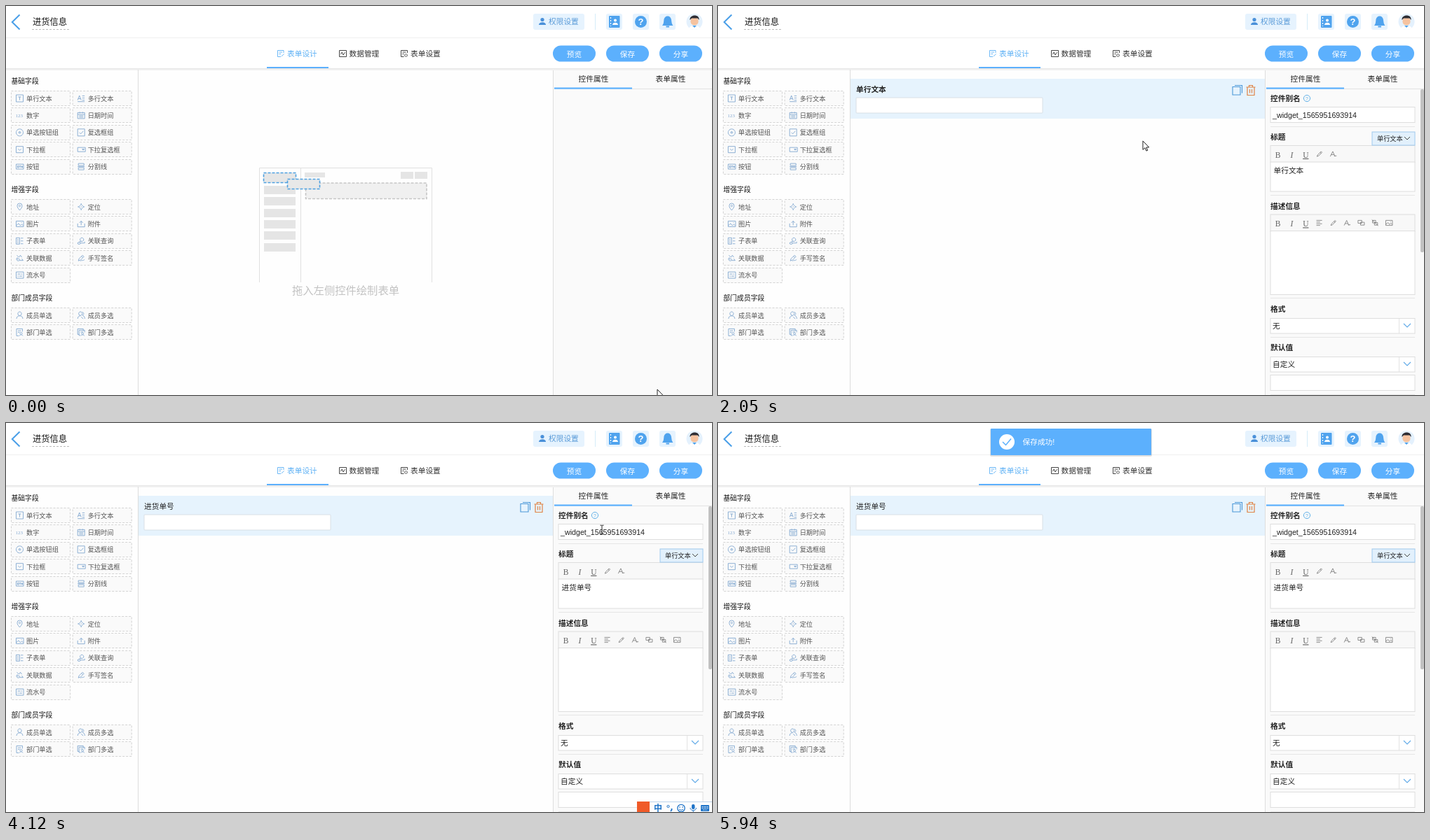
These frames come from a looping animation (1007 by 556 pixels, 6180 ms). An HTML page:

```html
<!DOCTYPE html>
<html lang="zh-CN">
<head>
<meta charset="utf-8">
<title>表单设计</title>
<style>
html, body { margin: 0; width: 100%; height: 100%; overflow: hidden; background: #fefefe; }
svg { display: block; width: 1007px; height: 556px; }
text { font-family: "Liberation Sans", "Noto Sans CJK SC", "Noto Sans CJK", sans-serif; white-space: pre; }
.serif { font-family: "Liberation Serif", "Noto Serif", serif; }
</style>
</head>
<body>
<svg id="stage" viewBox="0 0 1007 556"></svg>
<script>
const LOOP = 6180;
const BLUE = '#5cb0fd', PALE = '#e6f3fe', LINE = '#dedede';
const S = 9.2, M = 10.7, L = 12.25;

// Drawing helpers: every one returns SVG markup
const rect = (x, y, w, h, fill, more = '') =>
  `<rect x="${x}" y="${y}" width="${w}" height="${h}" fill="${fill}" ${more}/>`;
const box = (x, y, w, h, fill = '#fff', stroke = LINE, more = '') =>
  rect(x + .5, y + .5, w, h, fill, `stroke="${stroke}" ${more}`);
const disc = (x, y, r, fill, more = '') => `<circle cx="${x}" cy="${y}" r="${r}" fill="${fill}" ${more}/>`;
const text = (x, cy, size, str, fill = '#222', more = '') =>
  `<text x="${x}" y="${(cy + size * .38).toFixed(2)}" font-size="${size}" fill="${fill}" ${more}>${str}</text>`;
const mid = 'text-anchor="middle"', bold = 'font-weight="700"';
const path = (d, stroke, width = 1, fill = 'none', more = '') =>
  `<path d="${d}" stroke="${stroke}" stroke-width="${width}" fill="${fill}" ${more}/>`;
const group = (id, body, more = '') => `<g id="${id}" ${more}>${body}</g>`;

// Line icons in a 10 by 10 cell
const ICONS = {
  text: 'M0 0H10V10H0ZM3 3H7M5 3V7.5',
  area: 'M0 7.5L2.5 1L5 7.5M1 5.5H4M6.5 1.5H10M6.5 4.5H10M6.5 7.5H10M0 9.7H10',
  date: 'M0 1H10V9.5H0ZM0 3.6H10M3 0V2M7 0V2M2 5.5H8M2 7.5H8',
  radio: 'M5 0a5 5 0 1 0 .01 0ZM5 3.6a1.4 1.4 0 1 0 .01 0ZM4.2 5H5.8',
  check: 'M0 0H10V10H0ZM2.5 5L4.5 7L8 3',
  drop: 'M0 .5H10V9.5H0ZM2.8 4L5 6.2L7.2 4',
  multi: 'M0 2H11V8H0ZM6.5 4.3H9.5L8 6Z',
  button: 'M0 1.5H10.5V8.5H0ZM2 3.8V6.5H3.5V3.8ZM4.5 4H6.5M5.5 4V6.5M7.5 6.5V4L9 6.5V4',
  divide: 'M1 .5H9V3.5H1ZM0 5H10M1 6.5H9V9.5H1Z',
  pin: 'M5 10C2 6.5 1.5 5 1.5 3.5A3.5 3.5 0 0 1 8.5 3.5C8.5 5 8 6.5 5 10ZM5 2.4a1.2 1.2 0 1 0 .01 0Z',
  locate: 'M5 1.5L8.5 5L5 8.5L1.5 5ZM5 0V2M5 8V10M0 5H2M8 5H10M4.3 5H5.7',
  image: 'M0 1H10.5V9H0ZM0 7.5L3.5 4.5L6 7.5L8 5.5L10 7.5M7 3.2H8',
  upload: 'M0 4.5V9.3H10V4.5M5 7V1M2.5 3.5L5 1L7.5 3.5',
  sub: 'M0 .5H5V9.5H0ZM1.5 3H3.5M1.5 5.2H3.5M1.5 7.4H3.5M6.5 1H10M6.5 5H10M6.5 9H10',
  query: 'M6 .5a2.6 2.6 0 1 0 .01 0ZM5 5.5L2 6.5M0 8.3a2 1.4 0 1 0 4 0a2 1.4 0 1 0 -4 0M4 8H10V6',
  link: 'M1 1L4 4L6 1L8 4M2 4L0 7M1 7.5a2 1.5 0 1 0 4 0a2 1.5 0 1 0 -4 0M5 8.5H10L8 6',
  sign: 'M1 9L2 6L7 1L9 3L4 8ZM4 9.5C6 7 7 10 10 7M5.5 2.5L7.5 4.5',
  serial: 'M0 .5H10.5V9.5H0ZM2 3.5H6M7 3.5H8.5M2 6.5H3.5M4.5 6.5H8.5',
  user: 'M5 0a2.6 2.8 0 1 0 .01 0ZM.5 10C.8 7 2.5 5.8 5 5.8S9.2 7 9.5 10',
  users: 'M4 0a2.5 2.7 0 1 0 .01 0ZM0 10C.3 7 1.8 5.8 4 5.8M6.5 .5C9.5 1 9 4.5 7 5C9 6 10 7.5 10.3 10M5 7.5L8 10',
  dept: 'M9 4V0H.5V10H4M2.5 2.7H7M2.5 5H5M7 5a1.5 1.5 0 1 0 .01 0M4.8 10C5 8 9 8 9.5 10',
  depts: 'M8 3V0H0V8H2M2 2V9.5H4M2 2H10V5M4 4.5H8M7 5.5a1.4 1.4 0 1 0 .01 0M4.8 10C5 8 9 8 9.5 10',
  form: 'M9 4V.5H.5V9.5H5M2.5 3H7M2.5 5.5H5M6 9L9.5 5.5',
  data: 'M0 .5H10V9.5H0ZM1.8 6L3.8 3L5.5 7L8.2 3.2',
  gear: 'M9.5 4V.5H.5V9.5H4.5M2.5 3H7.5M2.5 5.5H4.5M7.5 5.7a1.8 1.8 0 1 0 .01 0',
  pen: 'M1 9L2 6.5L7.5 1L9 2.5L3.5 8ZM6 2.5L7.5 4',
  font: 'M0 9L4 1L7.5 9M1.5 6H6M6 8H10',
  align: 'M0 1H9M0 3.7H6M0 6.4H9M0 9H6',
  chain: 'M0 1H6V5.5H0ZM4 4H10V8.5H4Z',
  unlink: 'M1 1H6V5H1ZM4 4.5H9V8.5H4ZM0 0L10 9.5'
};
const icon = (name, x, cy, color = '#83a9d1', k = 1) =>
  path(ICONS[name], color, .9, 'none', `transform="translate(${x} ${cy - 5 * k}) scale(${k})"`);

const FIELDS = [
  ['基础字段', 107, 132, '单行文本 text,多行文本 area,数字 num,日期时间 date,单选按钮组 radio,复选框组 check,下拉框 drop,下拉复选框 multi,按钮 button,分割线 divide'],
  ['增强字段', 262, 287, '地址 pin,定位 locate,图片 image,附件 upload,子表单 sub,关联查询 query,关联数据 link,手写签名 sign,流水号 serial'],
  ['部门成员字段', 417, 442, '成员单选 user,成员多选 users,部门单选 dept,部门多选 depts']
];

function field(x, cy, label, name, hot) {
  const mark = name === 'num'
    ? text(x + 6.5, cy, 7, '123', '#83a9d1', 'class="serif"')
    : icon(name, x + 7.5, cy);
  return box(x, Math.round(cy) - 11, 84, 21, hot ? '#e9f6fe' : '#fafafa', hot ? BLUE : '#d3d3d3',
    'stroke-dasharray="3 2"') + mark + text(x + 22, cy, S, label, '#555');
}

function sidebar() {
  return FIELDS.map(([title, y, first, list]) =>
    text(7.5, y, 9.8, title, '#111') + list.split(',').map((item, i) =>
      field(7 + 87.7 * (i % 2), first + 24.4 * (i >> 1), ...item.split(' '))).join('')
  ).join('') + rect(188, 91, 1, 465, '#dcdcdc');
}

function header() {
  const pill = (x, s) => rect(x, 56.5, 61, 23, BLUE, 'rx="11.5"') + text(x + 30.5, 68.5, M, s, '#fff', mid);
  const tile = x => rect(x, 11, 23, 23, PALE, 'rx="3"');
  const tab = (x, name, s, color) => icon(name, x, 68, color) + text(x + 14, 68, M, s, color);
  return rect(0, 0, 1007, 89, '#fff') + rect(0, 45, 1007, 1, '#efefef')
    + rect(0, 89, 1007, 1, '#e6e6e6') + rect(0, 90, 1007, 2, '#f1f1f1')
    + path('M19.5 12.5L8.8 23L19.5 33.5', '#4a9fe8', 2)
    + text(38, 22, L, '进货信息', '#111')
    + path('M37 33.5H91', '#bbb', 1, 'none', 'stroke-dasharray="3 2"')
    + rect(752, 11, 73, 23, PALE, 'rx="3"')
    + disc(765, 19.5, 2.6, '#4a90d9') + path('M760 27C760 22 770 22 770 27Z', 'none', 0, '#4a90d9')
    + text(774, 22, M, '权限设置', '#5a9bd8')
    + rect(840, 11, 1, 23, '#d4ecf8')
    + tile(856) + tile(894) + tile(932)
    + rect(860, 14, 15.5, 17, '#4fa3ee', 'rx="1"') + path('M862.5 16V29', '#fff', 1.2, 'none', 'stroke-dasharray="2 2"')
    + disc(869, 20.5, 2, '#fff') + path('M865 27C865 22.5 873 22.5 873 27Z', 'none', 0, '#fff')
    + disc(905.5, 22.5, 8.5, '#4fa3ee') + text(905.5, 22.5, 13, '?', '#fff', mid + ' ' + bold)
    + path('M936 28C938 26 938 23 938.4 20C939 12.500 948.500 12.500 949 20C949.500 23 949.500 26 951.500 28Z', 'none', 0, '#4fa3ee')
    + path('M941.500 29.500H946', '#4fa3ee', 2)
    + disc(982, 22.5, 11.5, '#e4f1fd')
    + path('M974.500 32C975 26.500 989 26.500 989.500 32C985 34.500 979 34.500 974.500 32Z', 'none', 0, '#fff')
    + path('M979 28L982 31L985 28Z', 'none', 0, '#4fa3ee')
    + rect(976.5, 16, 11, 11.5, '#f5c3a0', 'rx="5"')
    + path('M975.500 20C974.500 12 989.500 11 988.500 20L986.500 17.500H978Z', 'none', 0, '#2d2d33')
    + tab(387, 'form', '表单设计', '#5cb0f5') + tab(475.5, 'data', '数据管理', '#333') + tab(563, 'gear', '表单设置', '#333')
    + rect(372, 87, 88, 2, BLUE)
    + pill(780, '预览') + pill(856, '保存') + pill(932, '分享');
}

function emptyCanvas() {
  const grey = '#e5e5e5';
  const dashed = (x, y, w, h, stroke, fill) => rect(x, y, w, h, fill, `stroke="${stroke}" stroke-width="1.6" stroke-dasharray="4 2"`);
  let out = path('M361.500 395V231.500H607.500V395M420.500 232V395', '#e0e0e0');
  for (let i = 0; i < 6; i++) out += rect(368, Math.round(256.7 + 16.4 * i), 45, 12, grey);
  return out + rect(426, 238, 29, 7, grey) + rect(563, 237, 18, 10, grey) + rect(583, 237, 18, 10, grey)
    + dashed(427.5, 253, 172.5, 22.5, '#c6c6c6', '#f0f0f0')
    + dashed(367.5, 238.5, 46, 14, '#4da0e0', '#e6e6e6') + dashed(401.5, 247.5, 46, 14, '#4da0e0', '#e8e8e8')
    + text(484.5, 406, 15.3, '拖入左侧控件绘制表单', '#c3c3c3', mid);
}

function card() {
  return rect(189, 104, 591, 57, '#e6f3fd')
    + `<text id="label" x="197" y="123.100" font-size="${M}" fill="#222"></text>`
    + box(196.5, 130.5, 266, 22, '#fff', '#d8dfe6', 'rx="1"')
    + path('M737 113.500H747.500V124.500M734 115.500H745V127H734Z', '#4a97d8', 1.1)
    + path('M753.500 116H766.500M757.500 116V113.500H762.500V116M755 116V127.500H765V116M758.500 119V124.500M761.500 119V124.500', '#df8345', 1.2);
}

function properties() {
  const head = (y, s) => text(788, y, M, s, '#222', bold);
  const rule = y => rect(788, y, 206, 1, '#e6e6e6');
  const ink = '#777';
  const tools = (y, names) => box(787.5, y - 12.5, 206, 24, '#f8f8f8')
    + ['B', 'I', 'U'].map((c, i) => text(798.7 + 19.8 * i, y + 1, 11.5, c, '#666',
        `class="serif" ${mid} ${['', 'font-style="italic"', 'text-decoration="underline"'][i]}`)).join('')
    + names.map((n, i) => icon(n, 853.5 + 19.8 * i, y, ink, .9)).join('');
  const select = (y, s) => box(787.5, y - 11, 206, 21.5) + rect(971, y - 10, 1, 21, '#e2e2e2')
    + text(791, y, M, s) + path(`M978 ${y - 3}L983 ${y + 2}L988 ${y - 3}`, '#62abe8', 1.2);
  return head(132, '控件别名') + disc(840, 132, 4.6, 'none', 'stroke="#62b1e8"') + text(840, 132, 7, '?', '#62b1e8', mid)
    + box(787.5, 144, 206, 22) + text(791, 155.7, M, '_widget_1565951693914')
    + rule(172) + head(187, '标题')
    + tools(211.5, ['pen', 'font']) + box(787.5, 222.5, 206, 42)
    + box(932.5, 179.5, 61, 19, '#e2f0fc', '#9fcaee') + text(940, 189, S, '单行文本') + path('M979 187L983 191L987 187', '#444')
    + `<text id="entry" x="792.500" y="239.300" font-size="${M}" fill="#222"></text>`
    + rule(270) + head(286, '描述信息')
    + tools(310, ['align', 'pen', 'font', 'chain', 'unlink', 'image']) + box(787.5, 321, 206, 91)
    + rule(417) + head(433, '格式') + select(457, '无')
    + rule(473) + head(488, '默认值') + select(512, '自定义')
    + box(787.5, 527, 206, 22) + rule(555)
    + rect(1002, 119, 5, 233, '#c1c1c1', 'rx="2"');
}

function inputBar() {
  const ink = '#1f74c8';
  return box(915, 541, 100, 20, '#fdfdfd', '#bcd3ea') + rect(900, 541, 18, 15, '#f05a28')
    + text(924, 550.5, 12, '中', ink, bold)
    + disc(944.5, 548, 1.6, 'none', `stroke="${ink}"`) + path('M949.500 551V553L948 555', ink, 1.8)
    + disc(963, 550.5, 5.2, 'none', `stroke="${ink}" stroke-width="1.3"`)
    + path('M961 548V550M965 548V550M960 552Q963 555 966 552', ink)
    + rect(978, 545, 4.5, 7, ink, 'rx="2"') + path('M976 550C976 555 984.500 555 984.500 550M980.200 554V556', ink)
    + rect(991, 546, 12, 9, ink, 'rx="1"') + path('M992.500 548.500H1002M992.500 550.500H1002M994 553H1000', '#fff', 1, 'none', 'stroke-dasharray="1.500 1"');
}

const toast = () => rect(388, 8, 231, 40, '#000', 'opacity=".12" rx="2"') + rect(389, 8, 229, 38, BLUE, 'rx="1"')
  + disc(412, 27, 11, '#fff') + path('M406 27L410.500 31.500L418 22.500', BLUE, 1.5) + text(434.5, 27, M, '保存成功!', '#fff');

const POINTERS = {
  arrow: path('M0 0V12.500L3 9.800L5 14.200L6.800 13.400L4.900 9.100H8.800Z', '#222', 1, '#fff'),
  beam: path('M-2.500 -6H-.500L0 -5.500L.500 -6H2.500M0 -5.500V6M-2.500 6.500H2.500', '#222'),
  hand: path('M0 1C0 -.500 2.200 -.500 2.200 1V6L7 7C8 7.300 8.300 8 8 9.500L7 15.500H.500L-3.500 9.500C-4 8 -2.500 7.500 -1.500 8.500L0 10Z', '#222', 1, '#fff'),
  move: path('M0 -8L2.500 -5H1V-1H5V-2.500L8 0L5 2.500V1H1V5H2.500L0 8L-2.500 5H-1V1H-5V2.500L-8 0L-5 -2.500V-1H-1V-5H-2.500Z', '#5a4034', .9, '#fbe3d2')
};

document.getElementById('stage').innerHTML =
  rect(780, 91, 227, 465, '#fafafa') + header() + sidebar()
  + group('hover', field(7, 132, '单行文本', 'text', true))
  + group('empty', emptyCanvas()) + group('card', card())
  + rect(780, 92, 1, 464, '#dedede')
  + text(838, 104, M, '控件属性', '#222', mid) + text(948, 104, M, '表单属性', '#222', mid)
  + rect(893, 118, 114, 1, '#e2e2e2') + rect(782, 116.5, 111, 2.2, BLUE)
  + group('props', properties()) + group('caret', rect(0, 228.5, 1, 13, '#111'))
  + group('ime', inputBar()) + group('drag', field(7, 132, '单行文本', 'text', true), 'opacity=".8"')
  + group('press', disc(0, 0, 9, '#ee7345'), 'opacity=".75"')
  + group('pointer', Object.keys(POINTERS).map(k => group(k, POINTERS[k])).join(''))
  + group('toast', toast());

const $ = id => document.getElementById(id);
const show = (id, on) => { $(id).style.display = on ? '' : 'none'; };
const place = (id, x, y) => $(id).setAttribute('transform', `translate(${x.toFixed(1)} ${y.toFixed(1)})`);
const within = (v, a, b) => v >= a && v < b;

const RUNS = [[0, 0, 1], [70, 630, 8], [710, 710, 1], [950, 950, 1], [1110, 1660, 8], [1740, 2290, 8],
  [2370, 2950, 8], [3000, 3080, 2], [3560, 4120, 8], [4200, 4750, 8], [4830, 5390, 8], [5470, 5470, 1], [5710, 5940, 4]];
const STEPS = RUNS.flatMap(([a, b, n]) =>
  Array.from({ length: n }, (_, i) => Math.round((a + (n > 1 ? (b - a) * i / (n - 1) : 0)) / 10) * 10));

// Pointer stops: time, x, y
const STOPS = [[0, 929, 548], [10, 929, 548], [700, 69, 134], [1050, 69, 134], [1420, 314, 135], [1660, 314, 135],
  [2370, 823, 236], [3480, 823, 236], [3560, 807, 233], [4590, 883, 90], [4750, 886, 68], [4910, 886, 68],
  [5390, 953, 551], [5470, 955, 580], [LOOP, 955, 580]];
const TYPED = [[0, '单行文本'], [2600, '单行文'], [2690, '单行'], [2780, ''], [2860, '进'], [2950, '进货'],
  [3000, '进货单'], [3080, '进货单号']];

function pointerAt(t) {
  const i = STOPS.findIndex(s => s[0] > t);
  const [t0, x0, y0] = STOPS[i - 1], [t1, x1, y1] = STOPS[i];
  const p = (t - t0) / (t1 - t0), e = p * p * (3 - 2 * p);
  return [x0 + (x1 - x0) * e, y0 + (y1 - y0) * e];
}

function pointerKind(t, x, y) {
  if (within(t, 630, 1420) && x < 320) return 'move';
  if (t > 1420 && within(x, 788, 994)) {
    if (within(y, 56, 118)) return 'hand';
    if ([[144, 167], [223, 266], [321, 413], [527, 550]].some(r => within(y, ...r))) return 'beam';
  }
  return 'arrow';
}

function draw(now) {
  const clock = now % LOOP;
  const t = STEPS.filter(s => s <= clock).pop();
  const [x, y] = pointerAt(t), kind = pointerKind(t, x, y);
  const typed = TYPED.filter(e => e[0] <= t).pop()[1];

  place('pointer', x, y);
  for (const k in POINTERS) show(k, k === kind);
  show('hover', within(t, 710, 1110));
  show('drag', within(t, 1110, 1420));
  place('drag', x - 69, y - 134);
  show('press', within(t, 950, 1420) || within(t, 2450, 2600) || within(t, 4830, 4980));
  place('press', x, y);

  const dropped = t >= 1420;
  show('empty', !dropped);
  show('props', dropped);
  show('card', dropped);
  $('card').style.opacity = Math.min(1, Math.max(0, (t - 1400) / 310) ** 2);
  $('label').textContent = $('entry').textContent = typed;
  $('label').style.fontWeight = t < 2600 ? 700 : 400;
  show('caret', within(t, 2450, 3560));
  place('caret', 793 + typed.length * M, 0);
  show('ime', within(t, 2450, 4900));
  show('toast', t >= 5710);
  $('toast').style.opacity = Math.min(1, (t - 5630) / 310);
}

const start = performance.now();
function tick() {
  draw(performance.now() - start);
  requestAnimationFrame(tick);
}
tick();
</script>
</body>
</html>
```
